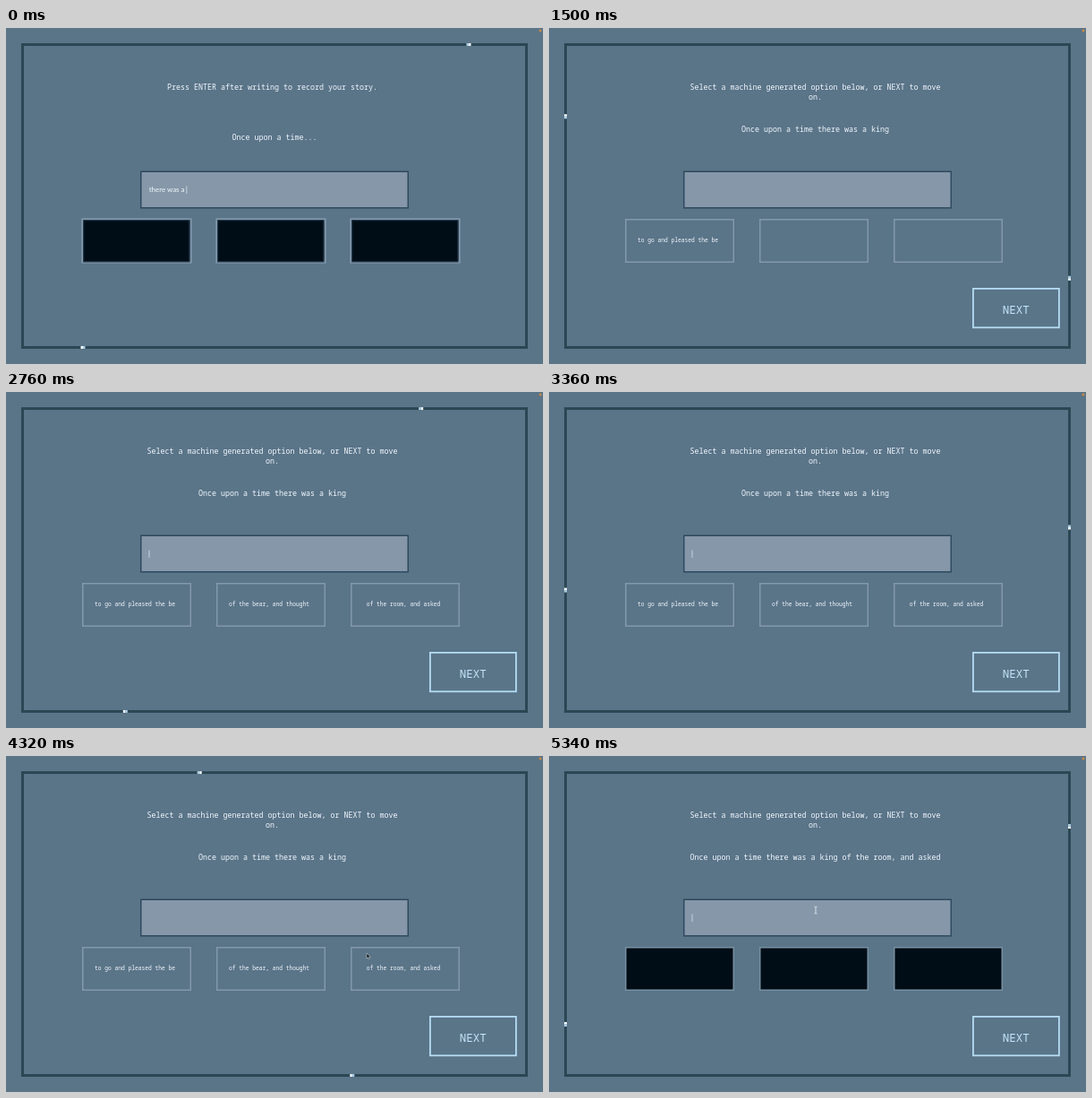
These frames come from a looping animation (600 px wide and 375 px high, 5400 ms). An HTML page:

```html
<!DOCTYPE html>
<html lang="en">
<head>
<meta charset="utf-8">
<title>Story machine</title>
<style>
  html, body { margin: 0; width: 100%; height: 100%; overflow: hidden; background: #5a7488; }
  svg { display: block; width: 100vw; height: 100vh; }
  text { fill: #f2f9ff; white-space: pre; font-family: "Noto Sans Mono", monospace; font-size: 8.33px; }
  .middle { text-anchor: middle; }
  .option text { font-size: 6.25px; }
  #typed { font-family: Lato, sans-serif; font-size: 7.95px; }
  #next text { fill: #c5e6fb; font-size: 12.5px; }
  .track { fill: none; stroke: #2c4754; stroke-width: 3; }
  .head { stroke: #f4fbff; }
  .tail { stroke: #a9cde4; }
</style>
</head>
<body>
<svg viewBox="0 0 600 375">
  <circle cx="597" cy="3" r="1.4" fill="#d08a3c"/>
  <g id="frame"><path class="track" d="M18.5 18.5H581.5V356.5H18.5Z"/></g>

  <text id="prompt" class="middle" x="297.5" y="69"></text>
  <text id="promptEnd" class="middle" x="297.5" y="79.5">on.</text>
  <text id="story" class="middle"></text>

  <rect x="150.75" y="160.25" width="298.5" height="40.5" fill="#8597a8" stroke="#2f4a60" stroke-width="1.5"/>
  <text id="typed" x="159.7" y="183.2"></text>
  <path id="caret" d="M0 176.5V185" stroke="#d5e2ec" stroke-width=".8"/>

  <g id="options"></g>

  <g id="next">
    <rect x="473.9" y="290.9" width="96" height="43.4" fill="none" stroke="#b5dcf4" stroke-width="1.8"/>
    <text class="middle" x="521.8" y="319">NEXT</text>
  </g>

  <path id="arrow" d="M0 0V6L1.4 4.8L2.4 7L3.4 6.5L2.4 4.4H4.2Z" fill="#0b1116" stroke="#dfe8ee" stroke-width=".5"/>
  <path id="beam" d="M-1.6 -4Q0 -4 0 -3Q0 -4 1.6 -4M0 -3V3M-1.6 4Q0 4 0 3Q0 4 1.6 4" fill="none" stroke="#d9e2e9" stroke-width="1"/>
</svg>
<script>
const LOOP = 5400, STEP = 60, LAP = 1802;
const SUBMIT = 1260, PICK = 4560;
const KEY_TIMES = [240, 420, 600, 780];
const OPTIONS = [
  { words: "to go and pleased the be", at: 1320 },
  { words: "of the bear, and thought", at: 1620 },
  { words: "of the room, and asked", at: 1920 },
];
// Pointer stops: time, x, y
const POINTER = [[4080, 340, 258], [4320, 403, 220], [4500, 428, 236], [4680, 428, 236], [5160, 298, 172]];

const $ = id => document.getElementById(id);
const show = (node, on) => node.setAttribute("visibility", on ? "visible" : "hidden");

function add(parent, tag, attrs) {
  const node = document.createElementNS("http://www.w3.org/2000/svg", tag);
  for (const key in attrs) node.setAttribute(key, attrs[key]);
  return parent.appendChild(node);
}

const track = document.querySelector(".track").getAttribute("d");
const runners = [498.5, 1396.5].map(start => ({
  start,
  parts: ["tail", "head"].map(kind => add($("frame"), "path", {
    d: track, class: "track " + kind, "stroke-dasharray": `2.5 ${LAP - 2.5}`,
  })),
}));

const boxes = OPTIONS.map(({ words }, i) => {
  const group = add($("options"), "g", { class: "option" });
  const left = 85 + 150 * i;
  const outer = add(group, "rect", {});
  const inner = add(group, "rect", {
    x: left + 1.6, y: 214.6, width: 118.3, height: 46.3,
    fill: "#000d16", stroke: "#21374a", "stroke-width": 1.2,
  });
  const label = add(group, "text", { class: "middle", x: left + 59, y: 239.2 });
  label.textContent = words;
  return { left, outer, inner, label };
});

function drawRunners(t) {
  // Half speed while typing, a pause, then full speed
  const steps = t < SUBMIT ? Math.min(t, 960) / STEP / 2 : 8 + (t - 1200) / STEP;
  for (const { start, parts } of runners) {
    const centre = start + 25.02 * steps;
    parts.forEach((part, i) =>
      part.setAttribute("stroke-dashoffset", -((centre - 2.5 + 2.5 * i) % LAP)));
  }
}

function drawText(t) {
  const submitted = t >= SUBMIT;
  $("prompt").textContent = submitted
    ? "Select a machine generated option below, or NEXT to move"
    : "Press ENTER after writing to record your story.";
  show($("promptEnd"), submitted);
  show($("next"), submitted);

  const story = $("story");
  story.textContent = !submitted ? "Once upon a time..."
    : "Once upon a time there was a king" + (t >= PICK ? " " + OPTIONS[2].words : "");
  story.setAttribute("x", submitted ? 297.5 : 300);
  story.setAttribute("y", submitted ? 116 : 125);

  const keys = KEY_TIMES.filter(time => t >= time).length;
  const typed = $("typed");
  typed.textContent = submitted ? "" : "there was a " + "king".slice(0, keys);
  const width = submitted ? 0 : typed.getComputedTextLength();
  $("caret").setAttribute("transform", `translate(${160 + width} 0)`);
  show($("caret"), !submitted || (t + 270) % 600 < 300);
}

function drawOptions(t) {
  const first = t < SUBMIT, dark = first || t >= PICK;
  boxes.forEach(({ left, outer, inner, label }, i) => {
    const grow = first ? 0.3 : 0;
    const attrs = {
      x: left + 0.75 - grow, y: 213.75 - grow, width: 120.5 + 2 * grow, height: 47.5 + 2 * grow,
      fill: dark ? "#000d16" : "none",
      stroke: dark && !first ? "#7890a2" : "#8299ab",
      "stroke-width": first ? 2.2 : 1.5,
    };
    for (const key in attrs) outer.setAttribute(key, attrs[key]);
    show(inner, first);
    show(label, !dark && t >= OPTIONS[i].at);
  });
}

function drawPointer(t) {
  const later = POINTER.findIndex(stop => stop[0] > t);
  let [, x, y] = POINTER[POINTER.length - 1];
  if (later > 0) {
    const [t0, x0, y0] = POINTER[later - 1], [t1, x1, y1] = POINTER[later];
    const p = (t - t0) / (t1 - t0), eased = p * p * (3 - 2 * p);
    x = x0 + (x1 - x0) * eased;
    y = y0 + (y1 - y0) * eased;
  }
  const inField = x > 150 && x < 450 && y > 160 && y < 201;
  for (const id of ["arrow", "beam"]) {
    $(id).setAttribute("transform", `translate(${x} ${y})`);
    show($(id), later !== 0 && (id === "beam") === inField);
  }
}

function draw(now) {
  const t = Math.floor((now % LOOP) / STEP) * STEP;
  drawRunners(t);
  drawText(t);
  drawOptions(t);
  drawPointer(t);
}

const began = performance.now();
function tick() {
  draw(performance.now() - began);
  requestAnimationFrame(tick);
}
tick();
</script>
</body>
</html>
```
